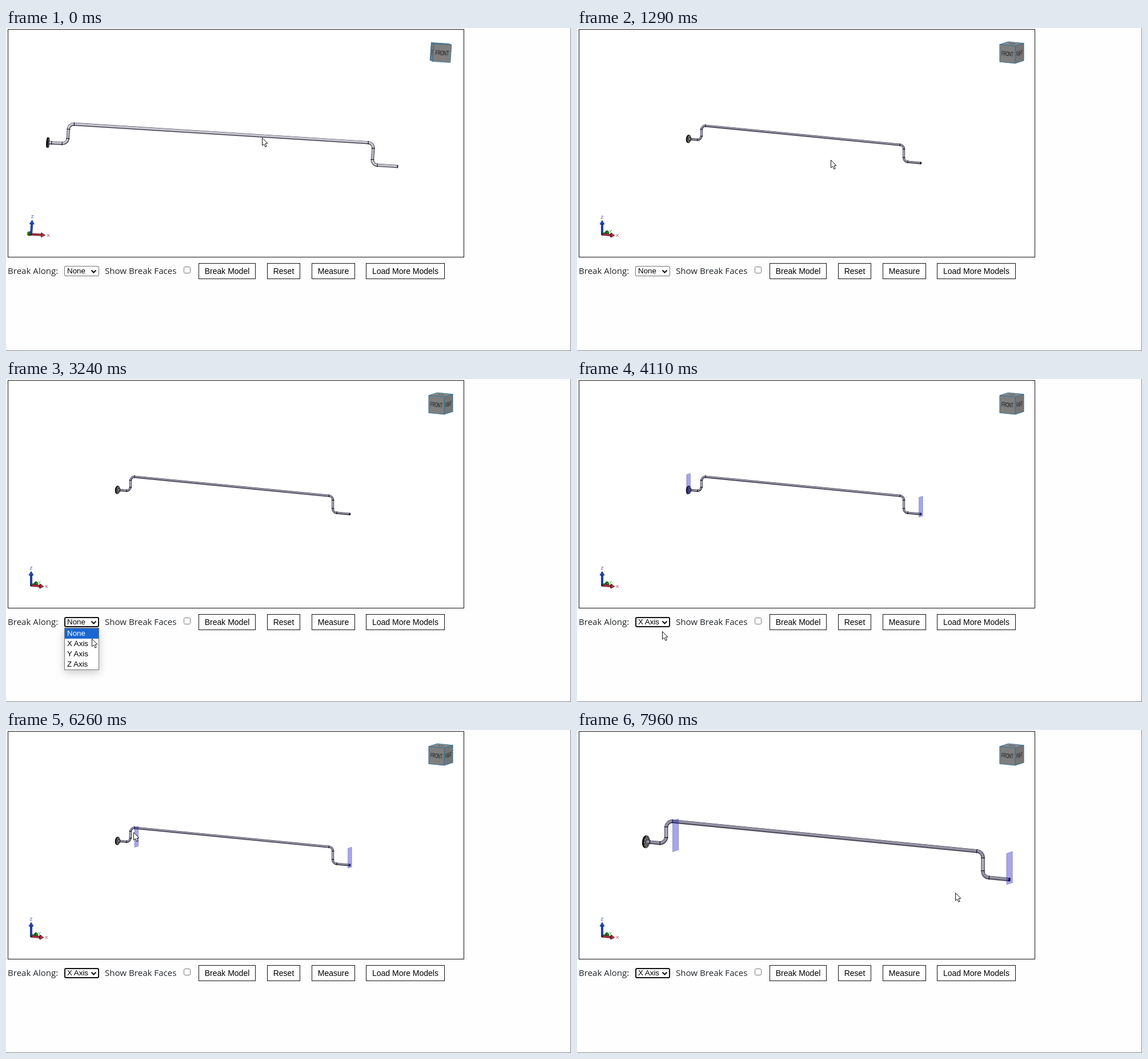
Recreate the animation shown at these times as an HTML page with a canvas. Size 989 by 566 pixels, loop 8000 ms.

```html
<!DOCTYPE html>
<html lang="en">
<head>
<meta charset="utf-8">
<title>Pipe viewer</title>
<style>
  html, body { margin: 0; width: 100%; height: 100%; overflow: hidden; background: #fefefe; }
  #stage { position: relative; width: 989px; height: 566px; overflow: hidden; box-sizing: border-box;
    border: solid #888; border-width: 0 1px 1px 0; }
  #stage > * { position: absolute; box-sizing: border-box; white-space: nowrap; }
  canvas { left: 0; top: 0; }
  #viewer { left: 3px; top: 2px; width: 799px; height: 400px; border: 1px solid #111; background: #fff; }
  .label { top: 412px; font: 15.1px/26px "Open Sans", "Noto Sans", sans-serif; color: #212529; }
  .button { top: 412px; height: 28px; border: 1px solid #111; background: #fff; text-align: center;
    font: 14px/26px Arial, "Liberation Sans", sans-serif; color: #000; }
  #select, #popup { left: 102px; width: 61px; background: #fff; color: #000;
    font: 13.333px/18px Arial, "Liberation Sans", sans-serif; }
  #select { top: 417px; height: 18px; padding-left: 5px; border-radius: 3px; box-shadow: inset 0 0 0 1px #767676; }
  #select.focus { box-shadow: inset 0 0 0 2px #101010; }
  #select svg { position: absolute; left: 46px; top: 5px; }
  #popup { top: 436px; border: 1px solid #767676; box-shadow: 0 4px 14px rgba(0,0,0,.22); }
  #popup div { padding-left: 4px; }
  #popup .on { background: #1967d2; color: #fff; }
  #check { left: 311px; top: 418px; width: 12px; height: 12px; border: 1px solid #767676; border-radius: 2.5px; background: #fff; }
</style>
</head>
<body>
<div id="stage">
  <div id="viewer"></div>
  <span class="label" style="left:3px">Break Along:</span>
  <div id="select"><span id="choice">None</span>
    <svg width="11" height="9" fill="none" stroke="#111" stroke-width="2"><path d="M1.5 2.5l4 4 4-4"/></svg></div>
  <span class="label" style="left:173px">Show Break Faces</span>
  <div id="check"></div>
  <div class="button" style="left:337px;width:100px">Break Model</div>
  <div class="button" style="left:457px;width:58px">Reset</div>
  <div class="button" style="left:535px;width:76px">Measure</div>
  <div class="button" style="left:630px;width:138px">Load More Models</div>
  <div id="popup"><div>None</div><div>X Axis</div><div>Y Axis</div><div>Z Axis</div></div>
  <canvas id="canvas" width="989" height="566"></canvas>
</div>
<script>
const $ = id => document.getElementById(id);
const g = $('canvas').getContext('2d');
const LOOP = 8000, STEP = 215.4;
const FONT = 'Arial, "Liberation Sans", sans-serif';

// Pointer stops: step, x, y. Each move slows down towards its stop.
const STOPS = [[0, 448, 192], [2, 448, 192], [3, 528, 211], [6, 444, 231], [7, 444, 231], [11, 156, 425],
  [14, 147, 424], [16, 151, 465], [18, 150, 456], [19, 149, 442], [22, 200, 134], [23, 193, 179],
  [29, 223, 179], [30, 250, 184], [33, 250, 184], [35, 706, 290], [37, 662, 285]];

const mix = (a, b, f) => a + (b - a) * f;
const ramp = (i, a, b) => Math.min(1, Math.max(0, (i - a) / (b - a)));

function pointer(i) {
  const n = STOPS.findIndex(s => s[0] >= i), b = STOPS[n], a = STOPS[n - 1] || b;
  const f = 1 - (1 - ramp(i, a[0], b[0] + 1e-9)) ** 2;
  return [mix(a[1], b[1], f), mix(a[2], b[2], f)];
}

// Orthographic projection: x right, y away from the viewer, z up.
function projector(angles) {
  const [[sy, cy], [sp, cp], [sr, cr]] = angles.map(d => [Math.sin(d * Math.PI / 180), Math.cos(d * Math.PI / 180)]);
  return (ox, oy, s) => (x, y, z) => {
    const u = x * cy + y * sy, v = (x * sy - y * cy) * sp - z * cp;
    return [ox + s * (u * cr - v * sr), oy + s * (u * sr + v * cr)];
  };
}

function poly(points, fill, stroke, width = 1) {
  g.beginPath();
  points.forEach(p => g.lineTo(...p));
  g.closePath();
  if (fill) { g.fillStyle = fill; g.fill(); }
  if (stroke) { g.strokeStyle = stroke; g.lineWidth = width; g.stroke(); }
}

function line(a, b, color, width) {
  g.beginPath();
  g.moveTo(...a);
  g.lineTo(...b);
  g.strokeStyle = color;
  g.lineWidth = width;
  g.stroke();
}

function label(text, x, y, size, color) {
  g.font = size + 'px ' + FONT;
  g.textAlign = 'center';
  g.textBaseline = 'middle';
  g.fillStyle = color;
  g.fillText(text, x, y);
}

function disc(P, x, y, z, r, fill, stroke, width) {
  const ring = Array.from({length: 28}, (_, k) => {
    const a = k * Math.PI / 14;
    return P(x, y + r * Math.cos(a), z + r * Math.sin(a));
  });
  poly(ring, fill, stroke, width);
}

const along = (a, b, d) => {
  const l = Math.hypot(b[0] - a[0], b[1] - a[1]);
  return [mix(a[0], b[0], d / l), mix(a[1], b[1], d / l)];
};

// Dark joint line across the pipe at p, which runs towards q.
function seam(p, q, w) {
  const l = Math.hypot(q[0] - p[0], q[1] - p[1]), nx = (p[1] - q[1]) / l * w / 2, ny = (q[0] - p[0]) / l * w / 2;
  line([p[0] - nx, p[1] - ny], [p[0] + nx, p[1] + ny], '#08080c', 1.1);
}

function drawPipe(P, s, yaw) {
  const w = 4 * s, r = 7 * s, light = 73 - (yaw + 10) * .5, top = 26.3, end = -2.5;
  const pts = [[2, 0], [26, 0], [26, top], [431, top], [431, end], [465, end]].map(([x, z]) => P(x, 0, z));
  const tube = (color, width, dx = 0, dy = 0) => {
    g.save();
    g.translate(dx, dy);
    g.beginPath();
    g.moveTo(...pts[0]);
    for (let k = 1; k < 5; k++) g.arcTo(...pts[k], ...pts[k + 1], r);
    g.lineTo(...pts[5]);
    g.strokeStyle = color;
    g.lineWidth = width;
    g.stroke();
    g.restore();
  };

  disc(P, -.8, 0, 0, 6.8, '#000', '#000', .8);
  disc(P, .8, 0, 0, 6.8, '#74746f', '#000', .9);
  for (let k = 0; k < 8; k++) {
    const a = (k + .5) * Math.PI / 4;
    disc(P, .8, 5.1 * Math.cos(a), 5.1 * Math.sin(a), .75, '#0a0a0a');
  }
  disc(P, 1.2, 0, 0, 2.8, '#85838a', '#000', .8);

  tube('hsl(245 16% 21%)', w);
  tube(`hsl(250 7% ${light}%)`, w - 1.6, -.1 * s, -.3 * s);
  tube(`hsl(250 8% ${light + 9}%)`, w * .3, -.3 * s, -.5 * s);
  for (const k of [1, 3])
    line(along(pts[k], pts[k + 1], r), along(pts[k + 1], pts[k], r), 'hsl(250 7% 72%)', w * .5);
  for (let k = 1; k < 5; k++) for (const q of [pts[k - 1], pts[k + 1]]) seam(along(pts[k], q, r), q, w + .6);
  seam(P(5, 0, 0), pts[1], w + 1);
  disc(P, 465, 0, end, 2, '#08080c', '#08080c', 1);
  disc(P, 465, 0, end, .8, '#66646c');
}

function drawPlane(P, x) {
  const [y, lo, hi] = [6.8, -7, 28.3];
  poly([P(x, -y, hi), P(x, y, hi), P(x, y, lo), P(x, -y, lo)], 'rgba(20,20,200,.38)', 'rgba(40,40,130,.4)', .8);
}

function drawCube(P) {
  const h = 15.5, d = 2 * h;
  const face = (o, u, v, fill, text) => {
    const a = P(...o), b = P(...u), c = P(...v);
    g.save();
    g.transform((b[0] - a[0]) / d, (b[1] - a[1]) / d, (c[0] - a[0]) / d, (c[1] - a[1]) / d, ...a);
    g.fillStyle = fill;
    g.fillRect(0, 0, d, d);
    g.translate(h, h + .5);
    g.scale(.6, 1);
    label(text, 0, 0, 11.5, '#111');
    g.restore();
    poly([a, b, [b[0] + c[0] - a[0], b[1] + c[1] - a[1]], c], null, '#2f6f92', .9);
  };
  const [A, B, C, D] = [[-h, -h, h], [h, -h, h], [h, h, h], [-h, h, h]];
  const low = ([x, y]) => [x, y, -h];
  face(D, C, A, '#8a8a8a', 'TOP');
  if (P(...C)[0] > P(...B)[0]) face(B, C, low(B), '#757575', 'RIGHT');
  else face(D, A, low(D), '#707880', 'LEFT');
  face(A, B, low(A), '#7f7f7f', 'FRONT');
}

function drawTriad(P) {
  const axis = (x, y, z, color, dark, name) => {
    const on = d => P(d * x, d * y, d * z), o = on(0), base = on(18), tip = on(25);
    const angle = Math.atan2(tip[1] - o[1], tip[0] - o[0]);
    const flat = Math.hypot(tip[0] - o[0], tip[1] - o[1]) / 25;
    const nx = -Math.sin(angle) * 4, ny = Math.cos(angle) * 4;
    line(o, base, dark, 4);
    line(o, base, color, 2.4);
    g.beginPath();
    g.ellipse(...base, 4 * Math.sqrt(Math.max(0, 1 - flat * flat)), 4, angle, 0, 7);
    g.fillStyle = dark;
    g.fill();
    poly([[base[0] + nx, base[1] + ny], tip, [base[0] - nx, base[1] - ny]], color, dark, .7);
    label(name, ...on(30.5), 8, color);
  };
  axis(0, 1, 0, '#2f9a26', '#1b5a18', 'Y');
  axis(1, 0, 0, '#b02a3c', '#5c1a24', 'X');
  axis(0, 0, 1, '#2348c4', '#152a74', 'Z');
  g.beginPath();
  g.arc(...P(0, 0, 0), 2, 0, 7);
  g.fillStyle = '#2a2a30';
  g.fill();
}

function drawPointer(x, y) {
  const shape = [[0, 0], [0, 13.5], [3.1, 10.8], [5.3, 15.8], [7.6, 14.8], [5.5, 9.9], [9.4, 9.6]];
  poly(shape.map(([a, b]) => [x + .5 + a, y + .5 + b]), '#fff', '#111', 1);
}

function draw(i) {
  const [mx, my] = pointer(i);
  const open = i >= 14 && i < 19, chosen = i >= 19;

  // Zoom out, orbit, zoom in at the pointer, then pan.
  const far = mix(1.338, 1, ramp(i, 0, 2)), near = mix(1, 1.565, ramp(i, 29, 33));
  const orbit = ramp(i, 2, 6), pan = ramp(i, 35, 37);
  const yaw = mix(-9.5, 29, orbit);
  const view = projector([yaw, mix(3, 10.2, orbit), 4.1 * (1 - orbit ** 1.35)]);
  const cx = 398.5 + 56.5 * (1 - far) - 147.5 * (1 - near) - 43 * pan;
  const cy = 215.5 - 18.5 * (1 - far) - 31 * (1 - near) - 4 * pan;
  const scene = view(cx, cy, far * near);
  const model = (x, y, z) => scene(x - 232.5, y, z + 1.25);

  $('choice').textContent = chosen ? 'X Axis' : 'None';
  $('select').className = open || chosen ? 'focus' : '';
  $('popup').style.display = open ? '' : 'none';
  const row = Math.max(0, Math.floor((my - 437) / 18));
  [...$('popup').children].forEach((e, k) => e.className = k === row ? 'on' : '');

  g.clearRect(0, 0, 989, 566);
  g.save();
  g.beginPath();
  g.rect(4, 3, 797, 398);
  g.clip();
  drawPipe(model, far * near, yaw);
  if (chosen) {
    drawPlane(model, 38 * ramp(i, 23, 28));
    drawPlane(model, 465);
  }
  drawCube(view(761, 43, 1));
  drawTriad(view(44, 361.5, 1));
  g.restore();
  drawPointer(mx, my);
}

const start = performance.now();
function frame() {
  const t = (performance.now() - start) % LOOP;
  draw(Math.min(37, Math.floor((t + 10) / STEP)));
  requestAnimationFrame(frame);
}
frame();
</script>
</body>
</html>
```
